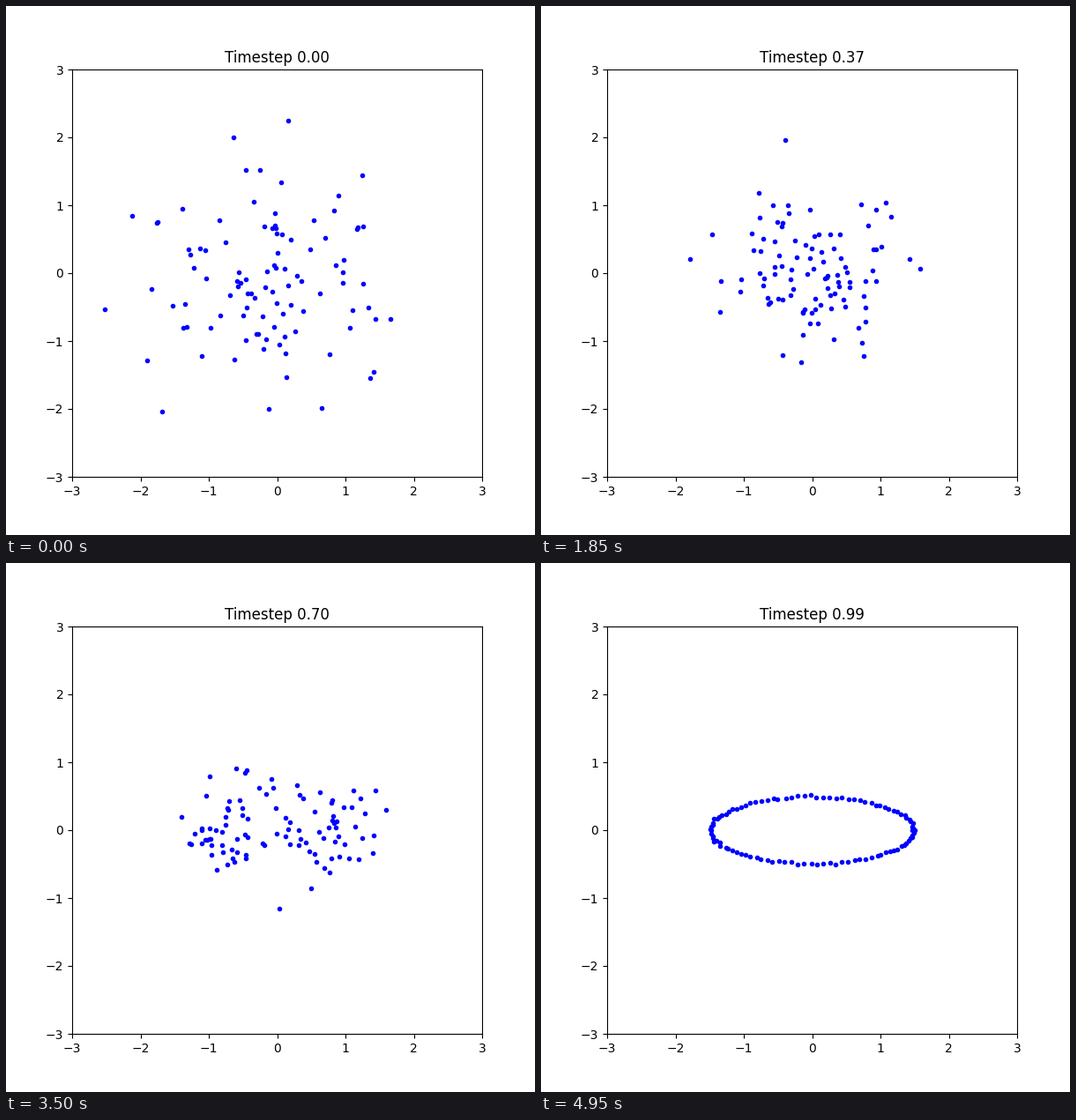
A matplotlib script for the animation above (5000 ms loop, 600x600 px).

```python
import numpy as np
import matplotlib.pyplot as plt
from matplotlib.animation import FuncAnimation

FRAMES = 100
POINTS = 100
LIMIT = 3

# Evenly spaced points on the ellipse that the cloud settles into
theta = np.linspace(0, 2 * np.pi, POINTS)
ellipse = np.column_stack([1.5 * np.cos(theta), 0.5 * np.sin(theta)])

# Every step blends the ellipse with fresh Gaussian noise
noise = np.random.default_rng(7).standard_normal((FRAMES, POINTS, 2))

fig, ax = plt.subplots(figsize=(6, 6), dpi=100)
ax.set_xlim(-LIMIT, LIMIT)
ax.set_ylim(-LIMIT, LIMIT)
dots, = ax.plot([], [], "b.", markersize=6)
title = ax.set_title("Timestep 0.00")


def update(i):
    t = i / FRAMES
    cloud = t * ellipse + (1 - t) * noise[i]
    dots.set_data(cloud[:, 0], cloud[:, 1])
    title.set_text(f"Timestep {t:.2f}")
    return dots, title


anim = FuncAnimation(fig, update, frames=FRAMES, interval=50, repeat=True)
plt.show()
```
